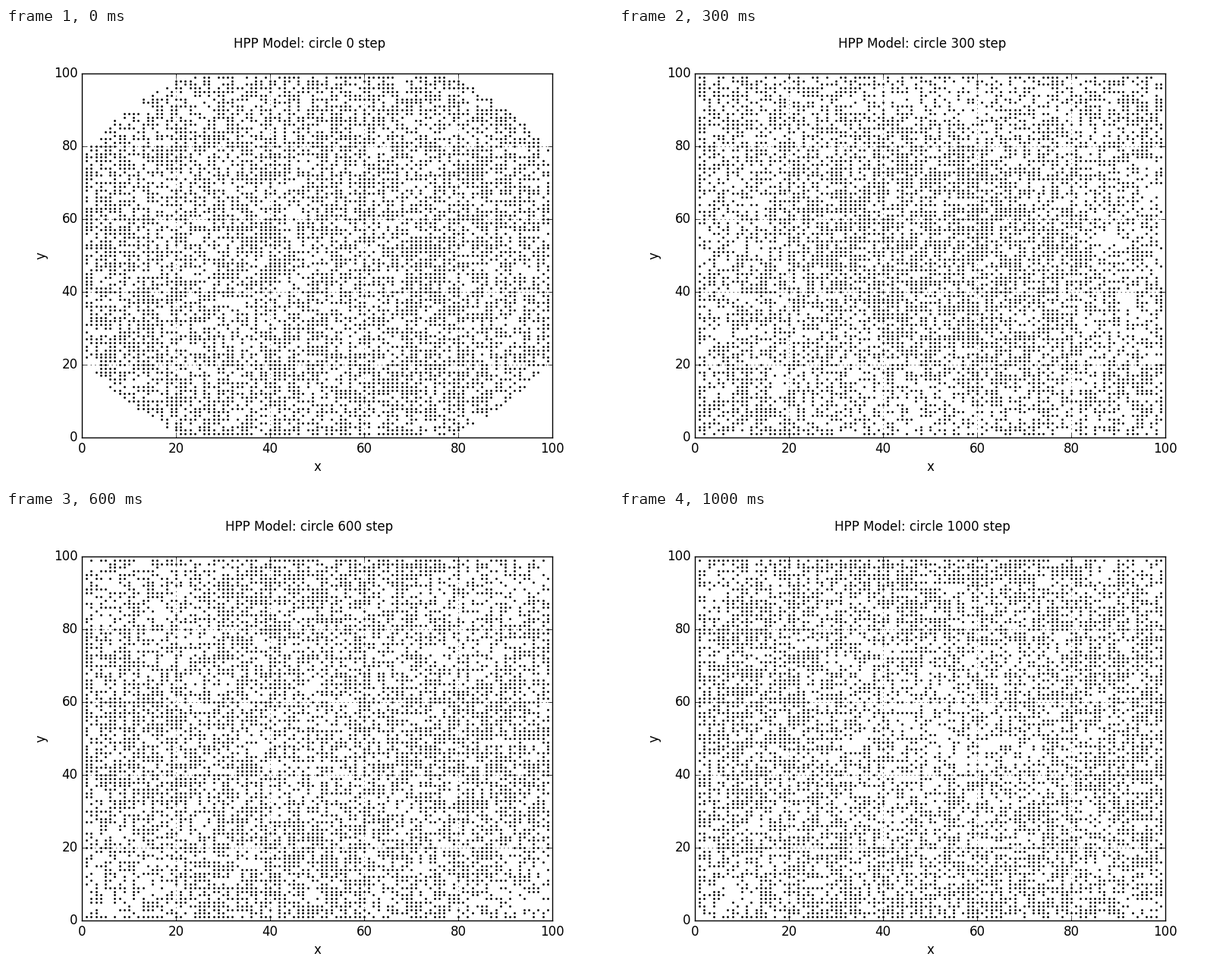
A matplotlib script that plays this animation: 800 px wide and 600 px high, repeating every 1100 ms.

```python
import matplotlib.pyplot as plt
import numpy as np
from matplotlib.animation import FuncAnimation

SIZE = 100          # walls sit at 0 and SIZE
STEPS = 100         # lattice steps between two pictures
FRAMES = 11
RADIUS = 57
DENSITY = 0.22      # chance of a particle per direction

rng = np.random.default_rng(7)


def start():
    """Random gas inside a circle; planes are right, left, up, down."""
    x, y = np.mgrid[:SIZE + 1, :SIZE + 1]
    inside = np.hypot(x - SIZE / 2, y - SIZE / 2) < RADIUS
    inside &= (x > 0) & (x < SIZE) & (y > 0) & (y < SIZE)
    return (rng.random((4, SIZE + 1, SIZE + 1)) < DENSITY) & inside


def collide(gas):
    """Turn head-on pairs by a right angle."""
    r, l, u, d = gas
    hit = (r == l) & (u == d) & (r != u)
    return r ^ hit, l ^ hit, u ^ hit, d ^ hit


def move(gas):
    """Shift every particle by one cell and bounce it off the walls."""
    r, l, u, d = gas
    r, l = np.roll(r, 1, 0), np.roll(l, -1, 0)
    u, d = np.roll(u, 1, 1), np.roll(d, -1, 1)
    for wall in (0, SIZE):
        r[wall], l[wall] = l[wall].copy(), r[wall].copy()
        u[:, wall], d[:, wall] = d[:, wall].copy(), u[:, wall].copy()
    return r, l, u, d


def simulate():
    """Collisions and moves take turns, one per step."""
    gas, shots = start(), []
    for n in range((FRAMES - 1) * STEPS + 1):
        if n % STEPS == 0:
            x, y = np.nonzero(np.any(gas, axis=0)[1:-1, 1:-1])
            shots.append((x + 1, y + 1))
        gas = move(gas) if n % 2 else collide(gas)
    return shots


shots = simulate()

plt.style.use("classic")
plt.rcParams.update({"font.family": "DejaVu Sans", "text.kerning_factor": 0})
fig, ax = plt.subplots(figsize=(8, 6), dpi=100, facecolor="white")
title = fig.suptitle("", fontsize=12)
dots, = ax.plot([], [], "k.", markersize=3)
ax.set(xlim=(0, SIZE), ylim=(0, SIZE), xlabel="x", ylabel="y")
ax.grid(True)


def draw(i):
    dots.set_data(*shots[i])
    title.set_text(f"HPP Model: circle {i * STEPS} step")
    return dots, title


anim = FuncAnimation(fig, draw, frames=FRAMES, interval=100,
                     repeat=True, repeat_delay=0, blit=False)
plt.show()
```
